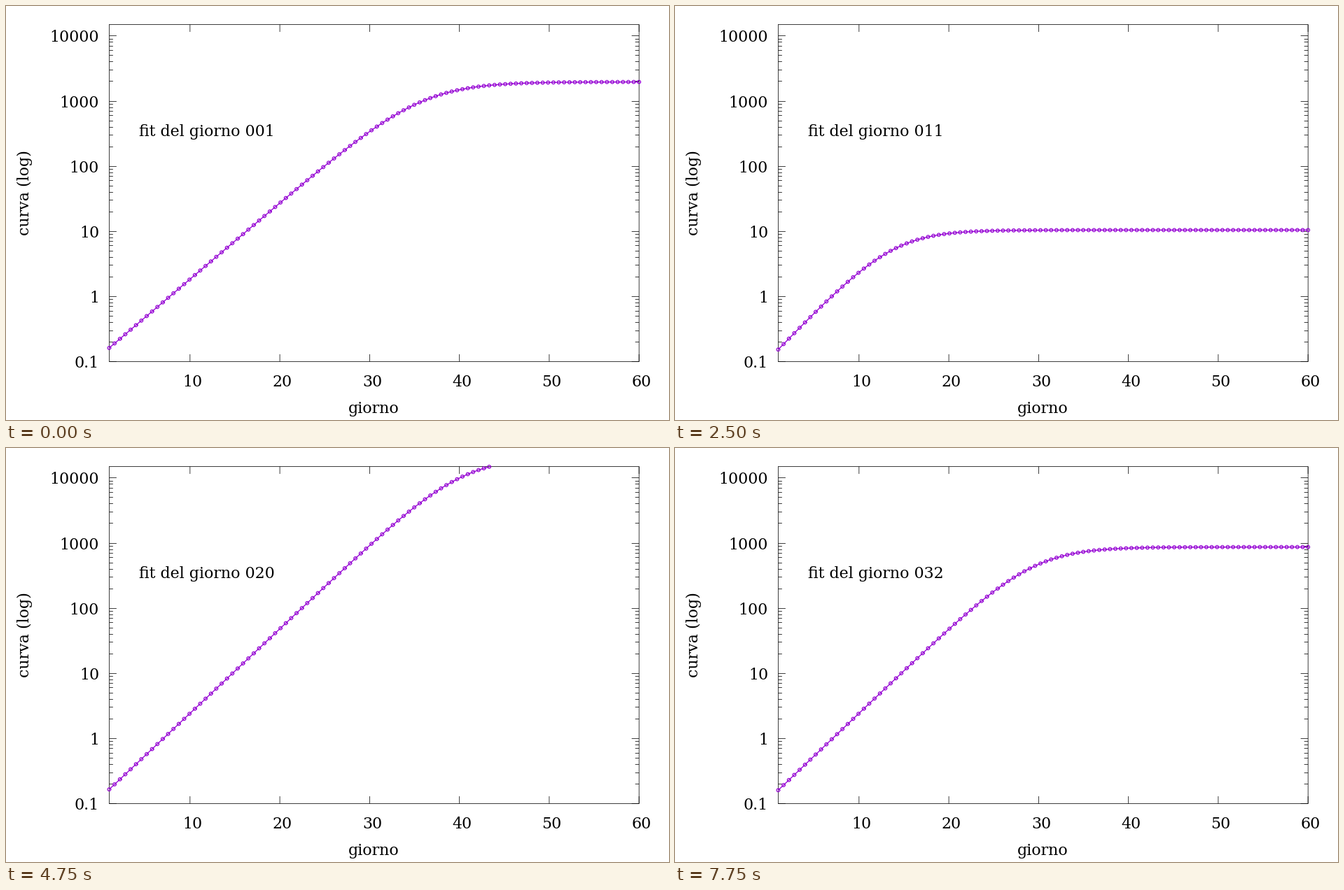
Write a matplotlib script that moves like this. It is 947 px wide and 592 px high and loops after 8000 ms.

```python
import numpy as np
import matplotlib.pyplot as plt
from matplotlib.animation import FuncAnimation
from matplotlib.patches import Rectangle

W, H, DPI = 947, 592, 64
PT = 72 / DPI  # points per pixel
LEFT, RIGHT, TOP, BOTTOM = 147.4, 904.2, 26.5, 508.5
DAY_MIN, DAY_MAX = 1, 60
LOG_MIN, LOG_MAX = -1, np.log10(15000)
VIOLET = "#9400d3"
DAYS = 32

# Key points by day: log10 of the plateau, and the growth rate
PLATEAU = {1: 3.295, 2: 4.1, 7: 1.1, 9: 4.5, 11: 1.02, 16: 4.36,
           22: 4.3, 24: 3.885, 26: 4.1, 28: 2.7, 31: 3.1, 32: 2.94}
RATE = {1: 0.2704, 7: 0.3205, 11: 0.3298, 16: 0.302,
        24: 0.296, 28: 0.3095, 32: 0.3025}


def at(keys, day):
    return np.interp(day, list(keys), list(keys.values()))


def to_x(day):
    return LEFT + (day - DAY_MIN) / (DAY_MAX - DAY_MIN) * (RIGHT - LEFT)


def to_y(value):
    share = (np.log10(value) - LOG_MIN) / (LOG_MAX - LOG_MIN)
    return BOTTOM - share * (BOTTOM - TOP)


def fit_curve(day, t):
    """Logistic fit; later fits pivot around a later day."""
    rate, cap = at(RATE, day), 10 ** at(PLATEAU, day)
    start = 0.162 * np.exp((0.302 - rate) * day ** 2 / 60)
    decay = np.exp(-rate * (t - DAY_MIN))
    return 1 / (1 / cap + (1 / start - 1 / cap) * decay)


def circles(x, y, radius):
    """Outlines of many circles as one path with gaps."""
    a = np.append(np.linspace(0, 2 * np.pi, 25), np.nan)
    return ((x[:, None] + radius * np.cos(a)).ravel(),
            (y[:, None] + radius * np.sin(a)).ravel())


plt.rcParams["font.family"] = "DejaVu Serif"
fig = plt.figure(figsize=(W / DPI, H / DPI), dpi=DPI, facecolor="white")
ax = fig.add_axes([0, 0, 1, 1])
ax.set_xlim(0, W)
ax.set_ylim(H, 0)
ax.axis("off")


def label(x, y, text, **kw):
    return ax.text(x, y, text, fontsize=22.1 * PT, color="black",
                   va="baseline", **kw)


def stroke(xs, ys):
    ax.plot(xs, ys, color="black", lw=0.75 * PT, snap=False,
            solid_capstyle="butt", zorder=3)


def y_tick(value, size):
    y = np.floor(to_y(value)) + 0.5
    stroke([LEFT, LEFT + size], [y, y])
    stroke([RIGHT - size, RIGHT], [y, y])


# Frame, ticks and labels
stroke([LEFT, RIGHT, RIGHT, LEFT, LEFT], [TOP, TOP, BOTTOM, BOTTOM, TOP])
for exponent in range(-1, 5):
    value = 10.0 ** exponent
    y_tick(value, 10.5)
    label(133, to_y(value) + 8.5, f"{value:g}", ha="right")
    if exponent < 4:
        for m in range(2, 10):
            y_tick(m * value, 5.5)
for day in range(10, 61, 10):
    x = to_x(day)
    stroke([x, x], [BOTTOM, BOTTOM - 10.5])
    stroke([x, x], [TOP, TOP + 10.5])
    label(x + 3.7, 544, str(day), ha="center")
label(525.7, 582, "giorno", ha="center")
label(33, 267.5, "curva (log)", ha="center", rotation=90,
      rotation_mode="anchor")
caption = label(189.7, 186, "", ha="left")

# Curve and its open circles
line, = ax.plot([], [], color=VIOLET, lw=1.3 * PT, snap=False, zorder=4)
line.set_clip_path(Rectangle((LEFT, TOP), RIGHT - LEFT, BOTTOM - TOP,
                             transform=ax.transData))
rings, = ax.plot([], [], color=VIOLET, lw=1.2 * PT, snap=False, zorder=5)

t = np.linspace(DAY_MIN, DAY_MAX, 100)
xs = to_x(t)


def draw(i):
    ys = to_y(fit_curve(i + 1, t))
    inside = ys >= TOP
    line.set_data(xs, ys)
    rings.set_data(*circles(xs[inside], ys[inside], 2.3))
    caption.set_text(f"\ufb01t del giorno {i + 1:03d}")
    return line, rings, caption


anim = FuncAnimation(fig, draw, frames=DAYS, interval=250, repeat=True,
                     repeat_delay=0)
plt.show()
```
